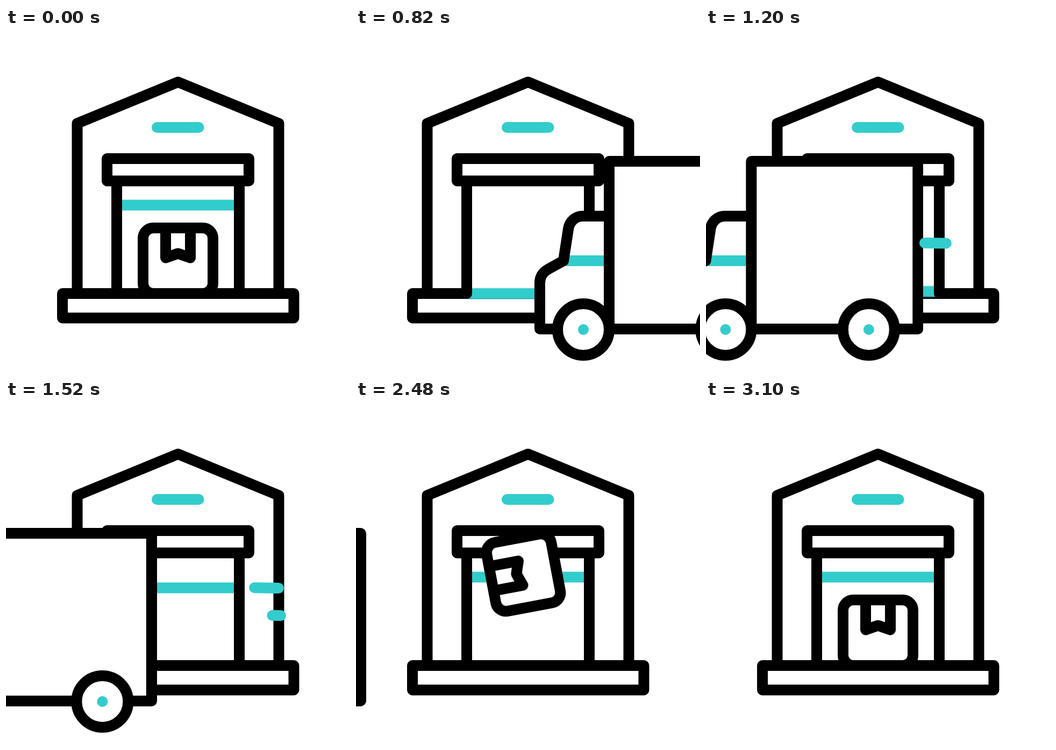
Write an HTML page that moves like this. It is 640 px wide and 640 px high and loops after 3.6 s.

```html
<!DOCTYPE html>
<html lang="en">
<head>
<meta charset="utf-8">
<title>Warehouse delivery</title>
<style>
  :root { --teal: #33cccc; }
  html, body { margin: 0; width: 100%; height: 100%; overflow: hidden; background: #fff; }
  svg { display: block; width: 100%; height: 100%; }

  .ink { fill: none; stroke: #000; stroke-width: 20; stroke-linecap: round; stroke-linejoin: round; }
  .solid { fill: #fff; }
  .teal { fill: none; stroke: var(--teal); stroke-width: 20; }
  .round { stroke-linecap: round; }
  .hub { fill: var(--teal); stroke: none; }

  .anim { animation: 3600ms linear infinite; }
  .shutter { animation-name: shutter; }
  .stored { animation-name: stored; animation-timing-function: step-end; }
  .thrown { animation-name: thrown; animation-timing-function: step-end; }
  .slide { animation-name: slide; }
  .hop { animation-name: hop; }
  .spin { animation-name: spin; transform-origin: 320px 433px; }
  .truck { animation-name: truck; }
  .dash { stroke-dasharray: 0 300; stroke-dashoffset: -150; }
  .wind { animation-name: wind; }
  .late { animation-delay: 70ms; }
  .puff { animation-name: puff; }

  @keyframes shutter {
    0%, 5.556% { transform: translateY(0); animation-timing-function: cubic-bezier(.3333, 0, .6667, 1); }
    18.333% { transform: translateY(164.5px); }
    32.167% { transform: translateY(164.5px); animation-timing-function: cubic-bezier(.3333, 0, .6667, 1); }
    45.056%, 100% { transform: translateY(0); }
  }
  @keyframes stored {
    0% { opacity: 1; }
    19.444%, 100% { opacity: 0; }
  }
  @keyframes thrown {
    0% { opacity: 0; }
    55.556%, 100% { opacity: 1; }
  }
  @keyframes slide {
    0%, 55.556% { transform: translateX(-147px); animation-timing-function: cubic-bezier(.3333, 1, .6667, 1); }
    77.278%, 100% { transform: translateX(0); }
  }
  @keyframes hop {
    0%, 55.556% { transform: translateY(-30px); animation-timing-function: cubic-bezier(.3333, .6667, .6667, 1); }
    65.625% { transform: translateY(-121.6px); animation-timing-function: cubic-bezier(.3333, 0, .6667, .3333); }
    77.278% { transform: translateY(0); animation-timing-function: cubic-bezier(.3333, .6667, .6667, 1); }
    80.278% { transform: translateY(-14px); animation-timing-function: cubic-bezier(.3333, 0, .6667, .3333); }
    83.333%, 100% { transform: translateY(0); }
  }
  @keyframes spin {
    0%, 57.306% { transform: rotate(0deg); animation-timing-function: cubic-bezier(.3333, .488, .6667, .883); }
    77.278%, 100% { transform: rotate(360deg); }
  }
  @keyframes truck {
    0%, 16.667% { transform: translateX(781px); animation-timing-function: cubic-bezier(.3333, 1, .6667, 1); }
    53.139% { transform: translateX(-149px); }
    53.667% { transform: translateX(-149px); animation-timing-function: cubic-bezier(.3333, 0, .6667, 0); }
    70.333%, 100% { transform: translateX(-459px); }
  }
  @keyframes wind {
    0%, 31.94% { stroke-dasharray: 0 300; stroke-dashoffset: -150; }
    31.95% { stroke-dasharray: 0 300; stroke-dashoffset: 0; }
    35.64%, 36.11% { stroke-dasharray: 100 300; stroke-dashoffset: 0; }
    43.33% { stroke-dasharray: 100 300; stroke-dashoffset: -100; }
    43.34%, 100% { stroke-dasharray: 100 300; stroke-dashoffset: -150; }
  }
  @keyframes puff {
    0%, 77.27% { stroke-dasharray: 0 300; stroke-dashoffset: -150; }
    77.28% { stroke-dasharray: 0 300; stroke-dashoffset: 0; }
    80% { stroke-dasharray: 100 300; stroke-dashoffset: 0; }
    85.83% { stroke-dasharray: 100 300; stroke-dashoffset: -100; }
    85.84%, 100% { stroke-dasharray: 100 300; stroke-dashoffset: -150; }
  }
</style>
</head>
<body>
<svg viewBox="0 0 640 640">
  <defs>
    <clipPath id="door"><rect x="206" y="284" width="228" height="221"/></clipPath>
    <g id="box" class="ink">
      <rect class="solid" x="255" y="372" width="130" height="122" rx="19"/>
      <path d="M297 372V427.500L320 419.500L343 427.500V372"/>
    </g>
    <g id="wheel">
      <circle class="ink solid" r="48"/>
      <circle class="hub" r="10"/>
    </g>
  </defs>

  <!-- warehouse -->
  <path class="ink" d="M132.500 494V177.500L320 100.500L507.500 177.500V494"/>
  <path class="teal round" d="M281 185H358.500"/>
  <rect class="ink solid" x="105" y="494" width="430.500" height="45.500"/>
  <use href="#box" class="anim stored"/>
  <g clip-path="url(#door)">
    <g class="anim shutter">
      <rect x="206" y="110" width="228" height="220" fill="#fff"/>
      <path class="teal" d="M206 329.500H434"/>
    </g>
  </g>
  <path class="ink" d="M206 284V494M434 284V494"/>
  <rect class="ink solid" x="188" y="243" width="264" height="41.500"/>

  <!-- parcel tossed from the truck -->
  <g class="anim thrown">
    <g class="anim slide"><g class="anim hop"><g class="anim spin">
      <use href="#box"/>
    </g></g></g>
  </g>

  <g class="anim truck">
    <path fill="#fff" d="M85 350H36C22 350 11 360 9 374L0 433L-29 449C-39 455 -44 464 -44 474V560H85Z"/>
    <path class="teal" d="M0 433H85"/>
    <path class="ink" d="M85 350H36C22 350 11 360 9 374L0 433L-29 449C-39 455 -44 464 -44 474V560H85"/>
    <rect class="ink solid" x="85" y="248" width="310" height="312"/>
    <use href="#wheel" x="37" y="561"/>
    <use href="#wheel" x="303.500" y="561"/>
  </g>

  <!-- speed and landing streaks -->
  <path class="teal round dash anim wind" pathLength="100" d="M407 400L511 401"/>
  <path class="teal round dash anim wind late" pathLength="100" d="M400 348L507 350"/>
  <path class="teal round dash anim puff" pathLength="100" d="M230 474H175"/>
  <path class="teal round dash anim puff" pathLength="100" d="M410 474H454"/>
</svg>
</body>
</html>
```
